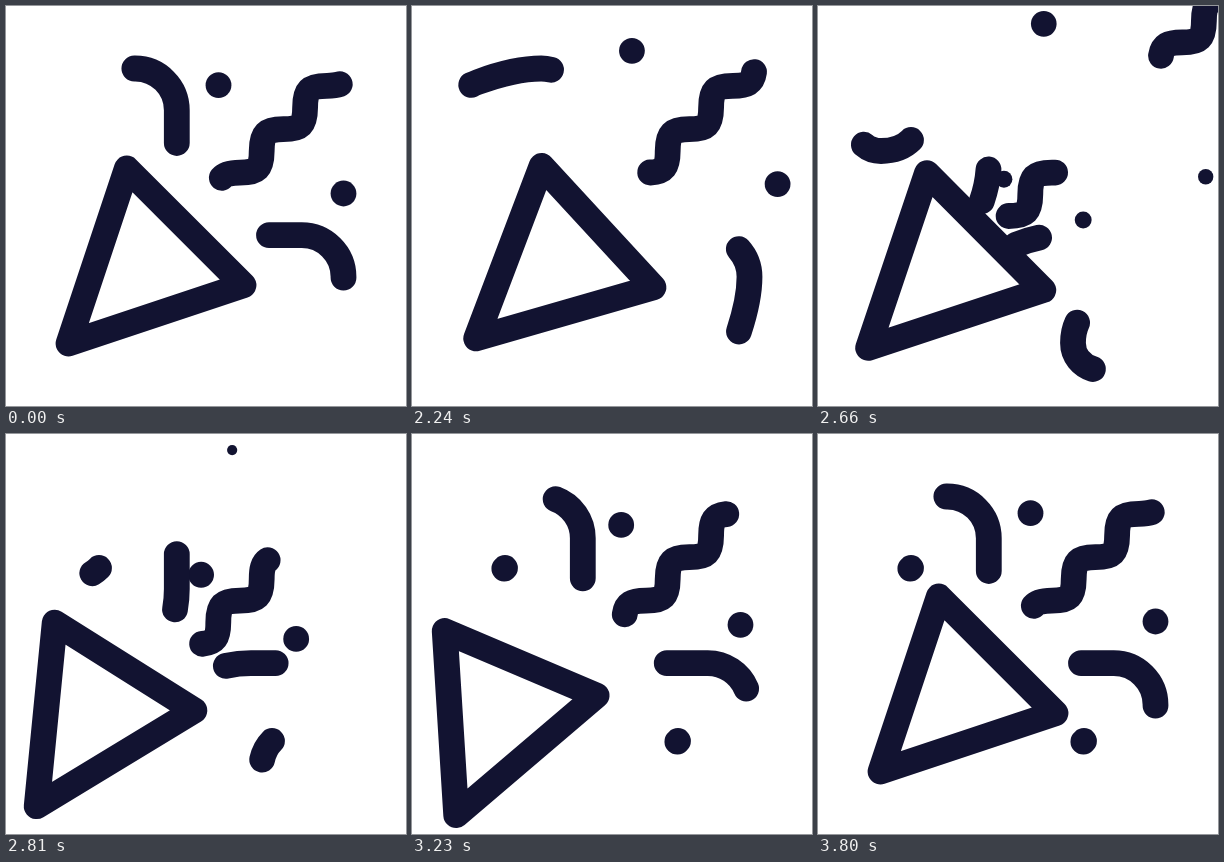
An HTML page with a canvas for the animation above (3860 ms loop, 400 by 400 pixels).

```html
<!DOCTYPE html>
<html lang="en">
<head>
<meta charset="utf-8">
<title>Party popper</title>
<style>
  html, body { margin: 0; width: 100%; height: 100%; overflow: hidden; background: #fff; }
  canvas { display: block; width: 100vmin; height: 100vmin; }
</style>
</head>
<body>
<canvas id="stage" width="400" height="400"></canvas>
<script>
const ctx = document.getElementById('stage').getContext('2d');
const LOOP = 3860, INK = '#121331', WIDTH = 25.8;
const LEAVE = 2030, FIRE = 2500, KICK = 2600, REST = 3800; // ms

// Wave of squarish quarter bends; positions along it are counted in bends.
const STEP = 21.7, BEND = STEP * 1.65, WAVE_START = -2;
let waveData = `M${234 + WAVE_START * STEP} ${166.6 - WAVE_START * STEP}`;
for (let i = 0; i < 12; i++) {
  const near = STEP * .8, far = STEP * .2;
  waveData += i % 2
    ? `c0 ${-near} ${far} ${-STEP} ${STEP} ${-STEP}`
    : `c${near} 0 ${STEP} ${-far} ${STEP} ${-STEP}`;
}
const wave = new Path2D(waveData);

// Ribbon leaving the popper, bending over and curling up; positions in pixels.
const ribbon = new Path2D('M160 205Q170.8 180 170.8 155V104.2A41.7 41.7 0 0 0 129.2 62.5' +
  'C110 62.5 85 69 66 76C44 84 35 100 35 113C35 130 46 145 63 145C76 145 86 141 93 134');
const cone = new Path2D('M-19.5 -97.2L-77.8 77.8L97.2 19.5Z');

const dots = [
  { from: [173, 219], home: [212.5, 79.2], to: [226.2, 15.9], gone: 2910 },
  { from: [230, 227], home: [337.5, 187.5], to: [389.3, 170.2], gone: 2810 }
];

const span = (t, a, b) => Math.min(1, Math.max(0, (t - a) / (b - a)));
const mix = (a, b, u) => a + (b - a) * u;
const easeIn = u => u * u;
const easeOut = (u, power = 3) => 1 - (1 - u) ** power;
const easeInOut = u => (1 - Math.cos(Math.PI * u)) / 2;
const arrive = (t, begin) => easeOut(span(t, begin, REST));

function dot([x0, y0], [x1, y1], u, scale) {
  ctx.beginPath();
  ctx.arc(mix(x0, x1, u), mix(y0, y1, u), scale * WIDTH / 2, 0, 2 * Math.PI);
  ctx.fill();
}

function strokePart(path, tail, head) {
  tail = Math.max(0, tail);
  if (head - tail < .01) return;
  ctx.setLineDash([head - tail, 9999]);
  ctx.lineDashOffset = -tail;
  ctx.stroke(path);
}

function drawDots(t) {
  for (const { from, home, to, gone } of dots) {
    dot(home, to, easeOut(span(t, LEAVE, 2950)), 1 - span(t, gone - 250, gone));
    const u = arrive(t, FIRE);
    dot(from, home, u, Math.min(1, 2 * u));
  }
}

function drawWave(t) {
  const part = (tail, head) =>
    strokePart(wave, (tail - WAVE_START) * BEND, (head - WAVE_START) * BEND);
  const out = easeIn(span(t, LEAVE, 2810));
  part(mix(-.5, 8.5, out), mix(4.5, 10.5, out));
  part(mix(WAVE_START, -.5, arrive(t, 2775)), mix(WAVE_START, 4.5, arrive(t, FIRE)));
}

function drawRibbon(t, delay) {
  const out = easeOut(span(t - delay, LEAVE, 2850), 1.2);
  strokePart(ribbon, mix(69.5, 363, out), mix(168.5, 406, out));
  const back = arrive(t, FIRE + delay);
  strokePart(ribbon, mix(-18, 69.5, back), mix(-18, 168.5, back));
}

// Lean forward, kick back, then return to zero.
function recoil(t, lean, kick, kickEnd, backStart, backEnd) {
  return lean * easeInOut(span(t, LEAVE, KICK))
    + (kick - lean) * easeOut(span(t, KICK, kickEnd))
    - kick * easeInOut(span(t, backStart, backEnd));
}

function drawCone(t) {
  const shift = recoil(t, 16, -62, 3040, 3090, 3660);
  const turn = recoil(t, 7.8, -22, 3250, 3250, REST);
  ctx.setTransform(1, 0, 0, 1, 140.3 + shift, 259.7 - .38 * shift);
  ctx.rotate(turn * Math.PI / 180);
  ctx.setLineDash([]);
  ctx.stroke(cone);
}

function draw(t) {
  ctx.resetTransform();
  ctx.fillStyle = '#fff';
  ctx.fillRect(0, 0, 400, 400);
  ctx.fillStyle = ctx.strokeStyle = INK;
  ctx.lineWidth = WIDTH;
  ctx.lineCap = ctx.lineJoin = 'round';
  drawDots(t);
  drawWave(t);
  drawRibbon(t, 0);
  ctx.setTransform(0, -1, -1, 0, 400, 400); // mirror across the firing line
  drawRibbon(t, 50);
  drawCone(t);
}

const start = performance.now();
function tick() {
  draw((performance.now() - start) % LOOP);
  requestAnimationFrame(tick);
}
tick();
</script>
</body>
</html>
```
